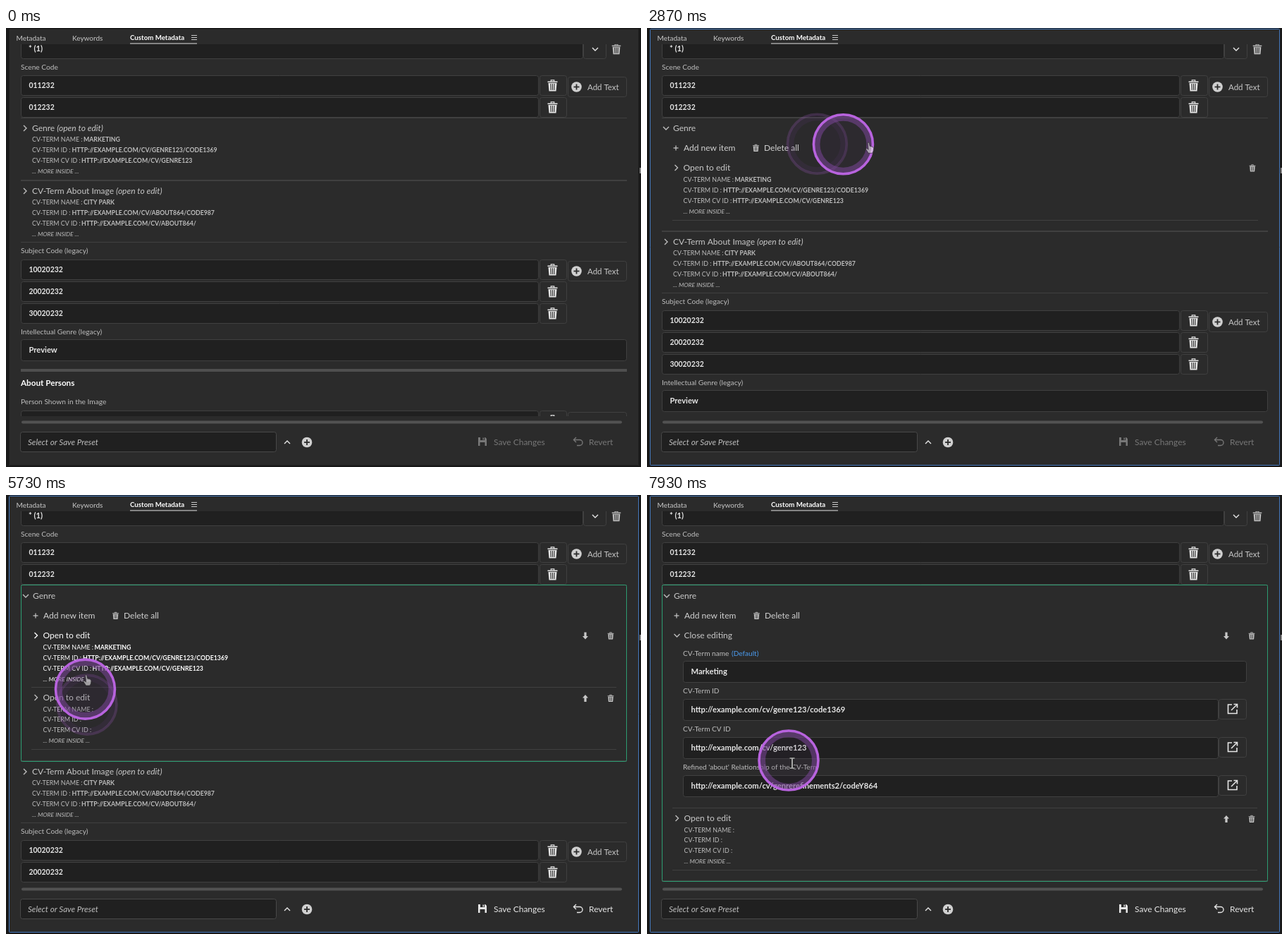
Write an HTML page with a canvas that moves like this. It is 901 by 622 pixels and loops after 8000 ms.

```html
<!DOCTYPE html>
<html lang="en">
<head>
<meta charset="utf-8">
<title>Custom Metadata panel</title>
<style>
html, body { margin: 0; width: 100%; height: 100%; overflow: hidden; background: #2b2b2b; }
canvas { display: block; }
</style>
</head>
<body>
<canvas id="stage" width="901" height="622"></canvas>
<script>
const c = document.getElementById('stage').getContext('2d');
const STEP = 1000 / 15, LOOP = 8000;
const BG = '#2b2b2b', DIM = '#bebebe', SOFT = '#c8c8c8', LIGHT = '#e6e6e6', WHITE = '#fff', EDGE = '#404040';

// Pointer path: [step, x, y], eased out between points.
const path = [
  [2, 752, 690], [13, 221, 172], [15, 221, 172], [25, 104, 162], [39, 104, 162],
  [51, 418, 167], [52, 414, 174], [61, 84, 188], [62, 84, 188], [65, 84, 174],
  [77, 84, 174], [84, 118, 324], [90, 108, 236], [100, 108, 236],
  [106, 216, 457], [111, 209, 398], [113, 209, 398], [118, 201, 376]
];

function pointerAt(n) {
  const i = path.findIndex(k => k[0] >= n);
  if (i < 0) return path[path.length - 1].slice(1);
  if (i === 0) return path[0].slice(1);
  const [a, ax, ay] = path[i - 1], [b, bx, by] = path[i];
  const p = 1 - ((b - n) / (b - a)) ** 2;
  return [ax + (bx - ax) * p, ay + (by - ay) * p];
}

function ramp(n, a, b) {
  const p = Math.min(1, Math.max(0, (n - a) / (b - a)));
  return p * p * (3 - 2 * p);
}

// y is the middle of the capitals; returns the end x.
function text(s, x, y, size, color = DIM, style = '') {
  c.font = `${style} ${size}px Lato, "Open Sans", sans-serif`;
  c.fillStyle = color;
  c.fillText(s, x, y + size * 0.35);
  return x + c.measureText(s).width;
}

function rect(x, y, r, b, color) {
  c.fillStyle = color;
  c.fillRect(x, y, r - x, b - y);
}

function box(x, y, r, b, fill, edge = EDGE, radius = 3) {
  c.beginPath();
  c.roundRect(x + 0.5, y + 0.5, r - x - 1, b - y - 1, radius);
  if (fill) { c.fillStyle = fill; c.fill(); }
  c.strokeStyle = edge;
  c.lineWidth = 1;
  c.stroke();
}

function line(points, color, width = 1.4) {
  c.beginPath();
  points.forEach(([x, y]) => c.lineTo(x, y));
  c.strokeStyle = color;
  c.lineWidth = width;
  c.stroke();
}

function shape(points, fill, edge) {
  c.beginPath();
  points.forEach(([x, y]) => c.lineTo(x, y));
  c.closePath();
  c.fillStyle = fill;
  c.fill();
  if (edge) { c.strokeStyle = edge; c.lineWidth = 1; c.stroke(); }
}

function at(x, y, scale, draw) {
  c.save();
  c.translate(x, y);
  c.scale(scale, scale);
  draw();
  c.restore();
}

function chevron(x, y, turn, color = DIM) {
  c.save();
  c.translate(x, y);
  c.rotate(turn * Math.PI / 2);
  line([[-2, -4], [2, 0], [-2, 4]], color);
  c.restore();
}

function trash(x, y, scale = 1, color = LIGHT) {
  at(x, y, scale, () => {
    rect(-7, -6, 7, -4.4, color);
    line([[-2.2, -6], [-2.2, -7.6], [2.2, -7.6], [2.2, -6]], color, 1.3);
    shape([[-6, -3.6], [6, -3.6], [5, 8], [-5, 8]], color);
    [-2.6, 0, 2.6].forEach(k => line([[k, -2.4], [k * 0.9, 6.4]], BG, 1.1));
  });
}

function disc(x, y, r, color) {
  c.beginPath();
  c.arc(x, y, r, 0, 7);
  c.fillStyle = color;
  c.fill();
}

function plusDisc(x, y) {
  disc(x, y, 7.3, '#d0d0d0');
  line([[x - 4, y], [x + 4, y]], BG, 1.8);
  line([[x, y - 4], [x, y + 4]], BG, 1.8);
}

function arrow(x, y, dir) {
  shape([[0, -5], [4, -0.5], [1.6, -0.5], [1.6, 5], [-1.6, 5], [-1.6, -0.5], [-4, -0.5]]
    .map(([a, b]) => [x + a, y + b * dir]), SOFT);
}

function field(value, x, y, r, b, edge, size = 11.2) {
  box(x, y, r, b, '#202020', edge);
  text(value, x + 11.5, (y + b) / 2, size, LIGHT, 'bold');
}

function codeRow(value, y) {
  field(value, 21, y, 756, y + 29, EDGE, 10.4);
  box(757, y, 796, y + 29);
  trash(775.5, y + 14.5);
}

function addText(y) {
  box(797, y, 881, y + 29);
  plusDisc(809.5, y + 14.5);
  text('Add Text', 825, y + 14.5, 11.5, SOFT);
}

function summary(x, y, values, color) {
  [['CV-TERM NAME :', 73], ['CV-TERM ID :', 56.5], ['CV-TERM CV ID :', 70]].forEach(([label, gap], i) => {
    const ly = y + i * 14.8;
    text(label, x, ly, 8.9, color);
    text(values[i] || '', x + gap, ly, 8.75, color, 'bold');
  });
  text('... MORE INSIDE ...', x, y + 44.6, 8.5, color, 'italic');
}

function closedGroup(title, y, values, color) {
  chevron(27, y, 0, color);
  const titleColor = color === DIM ? SOFT : color;
  const end = text(title + ' ', 37, y, 12, titleColor);
  text('(open to edit)', end, y, 12, titleColor, 'italic');
  summary(37, y + 16, values, color);
}

const genre = ['MARKETING', 'HTTP://EXAMPLE.COM/CV/GENRE123/CODE1369', 'HTTP://EXAMPLE.COM/CV/GENRE123'];
const about = ['CITY PARK', 'HTTP://EXAMPLE.COM/CV/ABOUT864/CODE987', 'HTTP://EXAMPLE.COM/CV/ABOUT864/'];

function editor(cy) {
  const end = text('CV-Term name ', 51, 224.5, 10.1);
  text('(Default)', Math.max(end, 120), 224.5, 10.1, '#4b9cf0');
  [['', 'Marketing'],
   ['CV-Term ID', 'http://example.com/cv/genre123/code1369'],
   ['CV-Term CV ID', 'http://example.com/cv/genre123'],
   ["Refined 'about' Relationship of the CV-Term", 'http://example.com/cv/genrerefinements2/codeY864']
  ].forEach(([label, value], i) => {
    const y = 235 + i * 54;
    text(label, 51, y - 12, 10.1);
    field(value, 51, y, i ? 811 : 851, y + 31, cy > y - 3 && cy < y + 35 ? '#5c5c5c' : EDGE);
    if (!i) return;
    box(811, y, 851, y + 29);
    at(831, y + 14, 1, () => {
      line([[-1, -6], [-6.5, -6], [-6.5, 6.5], [6, 6.5], [6, 1]], LIGHT, 1.6);
      line([[-2, 2], [6, -6]], LIGHT, 1.6);
      line([[1.5, -6.5], [6.5, -6.5], [6.5, -1.5]], LIGHT, 1.6);
    });
  });
}

function openGroup(state, grow, cx, cy) {
  const o = state > 1 ? 1 : 0;
  const over = (top, bottom, right) => cx < right && cy > top && cy < bottom;
  const overAdd = over(158, 184, 130);
  const first = state < 3 && over(185, 272, 315) ? WHITE : DIM;
  const second = state === 2 && over(273, 360, 315) ? WHITE : DIM;

  chevron(27 + o, 142 + o, 1);
  text('Genre', 37 + o, 142 + o, 12, SOFT);
  const addColor = overAdd ? WHITE : SOFT;
  line([[37.5 + o, 170 + o], [44.5 + o, 170 + o]], addColor, 1.2);
  line([[41 + o, 166.5 + o], [41 + o, 173.5 + o]], addColor, 1.2);
  text('Add new item', 52 + o, 170 + o, 12, overAdd ? WHITE : '#d2d2d2');
  trash(154.5 + o, 170 + o, 0.62, SOFT);
  text('Delete all', 166 + o, 170 + o, 12, '#d2d2d2');

  chevron(41.5 + o, 198 + o, state > 2 ? 1 : 0, first);
  text(state > 2 ? 'Close editing' : 'Open to edit', 51.5 + o, 198 + o, 12, first === WHITE ? WHITE : SOFT);
  trash(859 - o, 198.5 + o, 0.62, SOFT);
  if (state > 2) {
    c.save();
    c.beginPath();
    c.rect(22, 212, 858, 60 + grow);
    c.clip();
    editor(cy);
    c.restore();
  } else {
    summary(51.5 + o, 215 + o, genre, first);
  }
  rect(36, 272 + grow, 867 - o, 273 + grow, EDGE);
  if (state < 2) return;

  arrow(822, 199.5, -1);
  c.save();
  c.translate(0, grow);
  chevron(42.5, 287, 0, second);
  text('Open to edit', 52.5, 287, 12, second === WHITE ? WHITE : SOFT);
  arrow(822, 288, 1);
  trash(858, 288, 0.62, SOFT);
  summary(52.5, 303.5, [], second);
  rect(36, 360, 866, 361, EDGE);
  c.restore();
}

function lowerContent() {
  closedGroup('CV-Term About Image', 231, about, DIM);
  rect(21, 303, 881, 304, EDGE);
  text('Subject Code (legacy)', 21, 315, 10.2);
  ['10020232', '20020232', '30020232'].forEach((v, i) => codeRow(v, 328 + i * 31));
  addText(330);
  text('Intellectual Genre (legacy)', 21, 430, 10.2);
  field('Preview', 21, 441, 881, 472);
  rect(21, 483, 881, 487, '#4f4f4f');
  text('About Persons', 21, 503, 11.7, WHITE, 'bold');
  text('Person Shown in the Image', 21, 529, 10.2);
  codeRow('', 542);
  addText(544);
}

function footer(enabled) {
  c.beginPath();
  c.roundRect(22, 556.5, 852, 4, 2);
  c.fillStyle = '#525252';
  c.fill();
  box(20, 572, 384, 601, '#202020', '#484848');
  text('Select or Save Preset', 31, 586.5, 11.6, DIM, 'italic');
  chevron(399, 587, 3, LIGHT);
  plusDisc(427, 587);
  const color = enabled ? LIGHT : '#777';
  at(676, 586, 1, () => {
    shape([[-6, -6], [4, -6], [6, -4], [6, 6], [-6, 6]], color);
    rect(-3, -6, 3, -2, BG);
    rect(0.5, -5.5, 2, -2.5, color);
    rect(-3.5, 1, 3.5, 6, BG);
  });
  text('Save Changes', 692, 586.5, 12, color);
  line([[809, 580], [805.5, 583.5], [809, 587]], color);
  c.beginPath();
  c.moveTo(805.5, 583.5);
  c.lineTo(814, 583.5);
  c.arc(814, 587.5, 4, -Math.PI / 2, Math.PI / 2);
  c.lineTo(810, 591.5);
  c.stroke();
  text('Revert', 827, 586.5, 12, color);
}

function tabs() {
  text('Metadata', 14.5, 14, 10, SOFT);
  text('Keywords', 94, 14, 10, SOFT);
  text('Custom Metadata', 176, 14, 9.7, WHITE, 'bold');
  [10, 13, 16].forEach(y => rect(263, y, 271, y + 1, SOFT));
  rect(176, 21.5, 271, 22.5, '#ddd');
}

function ring(x, y, alpha) {
  c.globalAlpha = alpha;
  disc(x, y, 42, 'rgba(60,35,75,.12)');
  [[37, 8, 'rgba(122,70,152,.55)'], [42, 3.6, '#b863de']].forEach(([r, w, color]) => {
    c.beginPath();
    c.arc(x, y, r, 0, 7);
    c.lineWidth = w;
    c.strokeStyle = color;
    c.stroke();
  });
  c.globalAlpha = 1;
}

function cursor(x, y, state) {
  if (!state) {
    at(x - 2, y - 5, 1, () =>
      shape([[0, 0], [0, 13], [3, 10.2], [5.2, 15], [7.4, 14], [5.3, 9.3], [9.5, 9.3]], '#222', '#ddd'));
  } else if (state < 3) {
    at(x, y, 1, () => shape([[-3, -7], [-1, -7], [0, -2], [4, -1], [5.5, 1], [5, 5], [3.5, 8],
      [-2, 8], [-5.5, 2.5], [-4.5, 1], [-2, 3]], '#eee', '#222'));
  } else {
    [['#222', 4], ['#aaa', 2]].forEach(([color, w]) => {
      line([[x, y - 7], [x, y + 7]], color, w);
      line([[x - 3.5, y - 7], [x + 3.5, y - 7]], color, w * 0.8);
      line([[x - 3.5, y + 7], [x + 3.5, y + 7]], color, w * 0.8);
    });
  }
}

function draw(n) {
  const state = n < 30 ? 0 : n < 66 ? 1 : n < 91 ? 2 : 3;
  const edit = ramp(n, 90, 96);
  const shift = Math.round(72 * ramp(n, 29, 34) + 89 * ramp(n, 65, 72) + 170 * edit);
  const [x, y] = pointerAt(n);
  const [lx, ly] = pointerAt(n + 1);
  const cx = lx + 5, cy = ly + 4;

  rect(0, 0, 901, 622, '#191919');
  rect(4, 2, 898, 620, BG);
  rect(899, 198, 901, 206, '#888');
  box(4, 1, 898, 620, null, state ? '#4679bd' : '#202020', 1);
  tabs();

  c.save();
  c.beginPath();
  c.rect(5, 23, 892, 527);
  c.clip();
  field('', 21, 10, 819, 44);
  text('* (1)', 32, 29, 11.2, LIGHT, 'bold');
  box(819, 10, 852, 44);
  chevron(836, 30, 1, LIGHT);
  trash(866, 30, 0.9, '#bbb');
  text('Scene Code', 21, 55, 10.2);
  codeRow('011232', 67);
  codeRow('012232', 98);
  addText(69);
  rect(21, 127, 881, 128, EDGE);

  c.save();
  c.beginPath();
  c.rect(21, 127, 861, 89 + shift);
  c.clip();
  if (state) {
    openGroup(state, Math.round(171 * edit), cx, cy);
  } else {
    const over = n > 2 && cx < 314 && cy > 127 && cy < 216;
    if (over) rect(21, 128, 315, 216, '#393939');
    closedGroup('Genre', 142, genre, over ? WHITE : DIM);
  }
  c.restore();

  rect(21, 215 + shift, 881, 217 + shift, EDGE);
  c.save();
  c.translate(0, shift);
  lowerContent();
  c.restore();
  if (state > 1) box(21, 127, 881, 217 + shift, null, '#2d9d72', 2);
  c.restore();

  footer(state > 1);
  if (n < 3) return;
  const [px, py] = pointerAt(n - 1);
  if (Math.hypot(x - px, y - py) > 12) ring(px, py, 0.2);
  ring(x, y, 1);
  c.globalAlpha = Math.hypot(lx - x, ly - y) > 12 ? 0.6 : 1;
  cursor(cx, cy, state);
  c.globalAlpha = 1;
}

function tick() {
  draw(Math.floor((performance.now() % LOOP + 4) / STEP));
  requestAnimationFrame(tick);
}
tick();
</script>
</body>
</html>
```
